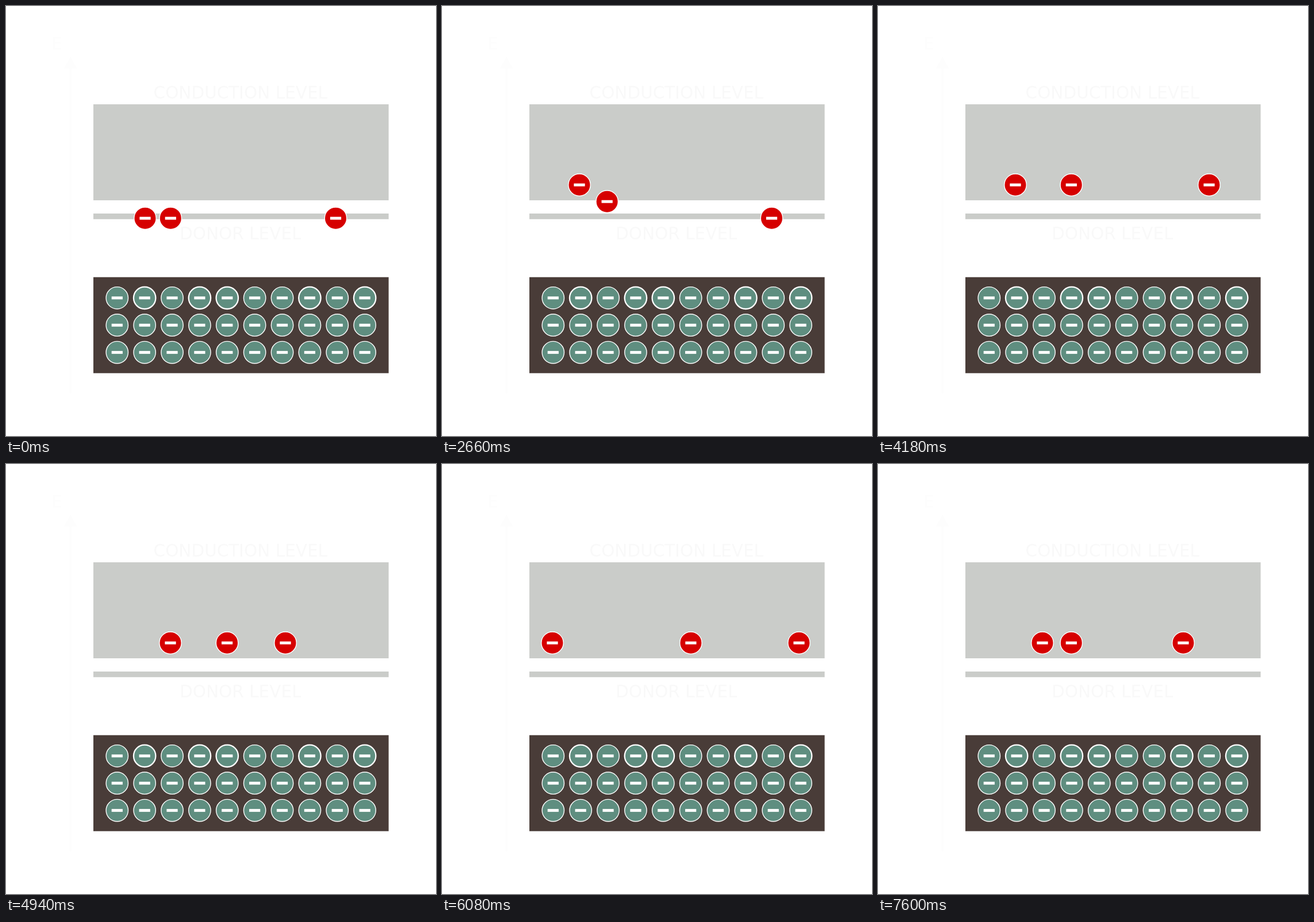
An HTML page that plays this animation: 748x748 px, repeating every 8.36 s.

```html
<!DOCTYPE html>
<html lang="en">
<head>
<meta charset="utf-8">
<title>Donor electrons</title>
<style>
html, body { margin: 0; width: 100%; height: 100%; overflow: hidden; background: #fff; }
svg { display: block; width: 100vw; height: 100vh; }
text { font: 29.5px "DejaVu Sans", Verdana, sans-serif; fill: #f9f9f9; text-anchor: middle; }
.axis { fill: #fdfdfd; }
</style>
</head>
<body>
<svg id="stage" viewBox="0 0 748 748">
  <text class="axis" x="88.5" y="75.5">E</text>
  <path class="axis" d="M112 88l11 21h-9v565h-4v-565h-9z"/>
  <text x="407.8" y="160.5">CONDUCTION LEVEL</text>
  <text x="407.8" y="405.8">DONOR LEVEL</text>
</svg>
<script>
const stage = document.getElementById("stage");
const LOOP = 8360, STEP = 380;
const DONOR_Y = 369.2, RISE = 29;
const FIRST_WALK = 11;

function add(parent, tag, attrs) {
  const el = document.createElementNS("http://www.w3.org/2000/svg", tag);
  for (const key in attrs) el.setAttribute(key, attrs[key]);
  return parent.appendChild(el);
}

function band(y, height, fill) {
  add(stage, "rect", { x: 152, y, width: 513.6, height, fill });
}

function place(el, x, y) {
  el.setAttribute("transform", `translate(${x} ${y})`);
}

function electron(fill, line = 1.4) {
  const g = add(stage, "g", {});
  add(g, "circle", { r: 19.2, fill, stroke: "#fff", "stroke-width": line });
  add(g, "rect", { x: -9.6, y: -2.5, width: 19.2, height: 5, fill: "#fff" });
  return g;
}

band(171, 167, "#caccc9");
band(361, 9.8, "#caccc9");
band(471.7, 167, "#493c38");

// Valence band: some top-row electrons have a heavier ring.
const heavy = [1, 3, 4, 7, 9];
for (let row = 0; row < 3; row++) {
  for (let col = 0; col < 10; col++) {
    const line = row === 0 && heavy.includes(col) ? 2.3 : 1.4;
    place(electron("#5f8e80", line), 193.3 + 47.87 * col, 507.8 + 47.4 * row);
  }
}

// Electrons leave the donor level in turn, then hop sideways: one sign per step.
const movers = [
  { from: 242, to: 239, hop: 47, walk: ".+.-.-+.+." },
  { from: 286.3, to: 288, hop: 48.3, walk: "+.+..+.-.-" },
  { from: 573.5, to: 576, hop: 45, walk: ".--+++..--" }
];
for (const mover of movers) mover.el = electron("#d60000");

function column(walk, step) {
  const done = [...walk.slice(0, Math.max(0, step - FIRST_WALK + 1))];
  return done.reduce((sum, move) => sum + (move === "+") - (move === "-"), 0);
}

function draw(now) {
  const step = Math.floor((now % LOOP) / STEP);
  movers.forEach(({ el, from, to, hop, walk }, i) => {
    const risen = Math.min(2, Math.max(0, step - 4 - 2 * i));
    const x = from + (to - from) * risen / 2 + hop * column(walk, step);
    place(el, x, DONOR_Y - RISE * risen);
  });
  requestAnimationFrame(draw);
}
draw(0);
</script>
</body>
</html>
```
